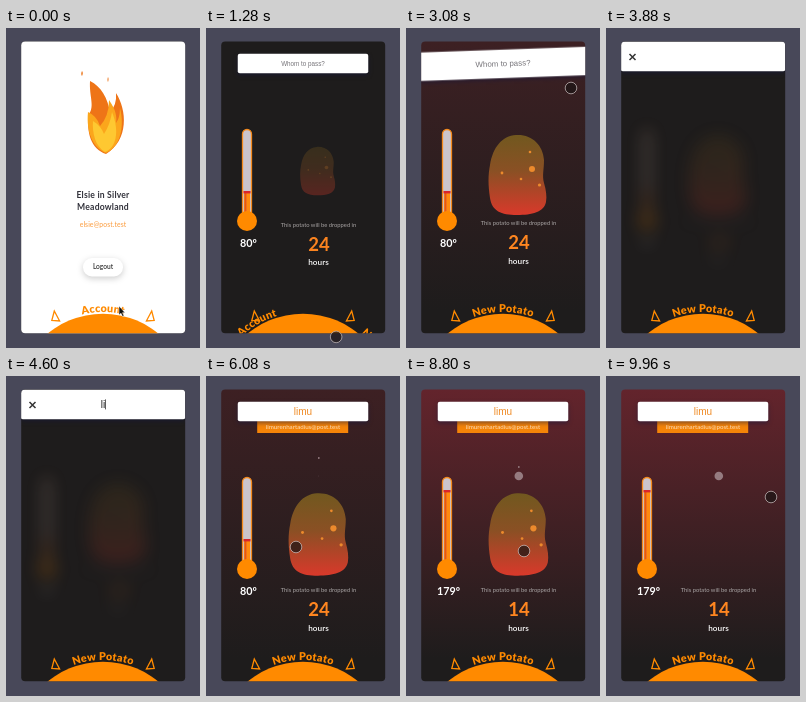
These frames come from a looping animation (194x320 px, 10 s). An HTML page:

```html
<!DOCTYPE html>
<html lang="en">
<head>
<meta charset="utf-8">
<style>
  html, body { margin: 0; width: 100%; height: 100%; overflow: hidden; background: #484859; }
  svg { display: block; width: 100vw; height: 100vh; }
  text { font-family: Lato, sans-serif; text-anchor: middle; }
  .bold { font-weight: 700; }
  .medium { font-weight: 600; }
  .label { font: 900 10.8px Lato, sans-serif; letter-spacing: .25px; fill: #ff8a00; }
  #name, #hint { font-family: "Liberation Sans", Arial, sans-serif; font-size: 10px; }
  #box { filter: drop-shadow(0 2px 2px rgba(20, 22, 60, .5)); }
</style>
</head>
<body>
<svg viewBox="0 0 194 320">
  <defs>
    <clipPath id="card"><rect x="15.2" y="13.6" width="164" height="291.6" rx="4"/></clipPath>
    <linearGradient id="heat" x2="0" y2="1"><stop id="hot"/><stop offset=".92" stop-color="#1e1c1c"/></linearGradient>
    <linearGradient id="skin" x2="0" y2="1">
      <stop stop-color="#71581f"/><stop offset=".45" stop-color="#8a5024"/><stop offset="1" stop-color="#d9392b"/>
    </linearGradient>
    <path id="arc" d="M-89.5 0A89.5 89.5 0 0 1 89.5 0"/>
  </defs>
  <g clip-path="url(#card)">
    <rect x="15" y="13" width="165" height="293" fill="url(#heat)"/>

    <g id="game">
      <g id="meter">
        <rect x="36.5" y="101.5" width="9" height="92" rx="4.5" fill="#cbc4cb" stroke="#f58a1c" stroke-width="1.3"/>
        <rect id="level" x="38" width="6" fill="#ff8a10"/>
        <rect id="core" x="38.6" width="1.8" fill="#e2541c"/>
        <rect id="cap" x="37.5" width="7" height="2.4" fill="#d8262c"/>
        <circle cx="41" cy="193" r="10" fill="#ff8a00"/>
        <text id="degrees" class="bold" x="42.5" y="219.3" font-size="10.8" fill="#fff"></text>
      </g>
      <g id="potato">
        <path d="M-2-40C14-41 25-30 26-15C26 -5 24 0 26 8C28 15 29 21 28 27C26 37 14 40-1 40C-17 40-26 36-28 23C-30 10-30 0-28-10C-25-28-16-39-2-40Z" fill="url(#skin)"/>
        <g fill="#ec8a2c">
          <circle cx="12" cy="-23" r="1.3"/><circle cx="14" cy="-6" r="3"/><circle cx="-16" cy="-2" r="1.4"/>
          <circle cx="3" cy="4" r="1.3"/><circle cx="21.5" cy="10" r="1.6"/>
        </g>
      </g>
      <g id="timer">
        <text x="112.5" y="197.3" font-size="5.8" fill="#aaa6a6">This potato will be dropped in</text>
        <text id="hours" class="bold" x="113" y="221.3" font-size="18.5" fill="#ff8620"></text>
        <text class="medium" x="112.5" y="235.6" font-size="8.2" fill="#fff">hours</text>
      </g>
      <g fill="#957b80"><circle id="ball" cx="112.8" cy="100"/><circle id="spark" cx="112.8" r=".9"/></g>
    </g>

    <g id="tag">
      <rect x="51.2" y="44" width="91" height="13" fill="#f58408"/>
      <text x="97" y="53.2" font-size="6.2" fill="#ffe3c0">limurenhartadius@post.test</text>
    </g>
    <g id="field">
      <rect id="box" fill="#fff" rx="2"/>
      <text id="hint" fill="#77757a">Whom to pass?</text>
      <text id="name" y="3.4"></text>
      <path id="caret" stroke="#333" stroke-width=".8"/>
    </g>
    <path id="close" d="M23.5 26l6 6m0-6l-6 6" stroke="#333" stroke-width="1.5"/>

    <g id="profile">
      <rect x="15" y="13" width="165" height="293" fill="#fff"/>
      <path id="back" fill="#ee7417"/>
      <path id="middle" fill="#fba61c"/>
      <path id="front" fill="#fec831"/>
      <g id="embers" fill="#f0924a"></g>
      <g class="bold" font-size="8.6" letter-spacing=".2" fill="#33333c">
        <text x="97" y="170">Elsie in Silver</text><text x="97" y="181.5">Meadowland</text>
      </g>
      <text x="97" y="198.7" font-size="6.8" letter-spacing=".1" fill="#fb9a3a">elsie@post.test</text>
      <rect x="77" y="230" width="40" height="18.5" rx="9" fill="#fff" style="filter:drop-shadow(0 2px 3px #0003)"/>
      <text class="medium" x="97" y="241.2" font-size="6.6" fill="#333">Logout</text>
    </g>

    <circle cx="97" cy="373" r="87.3" fill="#ff8a00"/>
    <path d="M48.3 283L45.8 292.5L53.6 293ZM145.7 283L148.2 292.5L140.4 293Z" fill="none" stroke="#ff8a00" stroke-width="1.3"/>
    <g id="wheel">
      <text class="label"><textPath href="#arc" startOffset="50%">Account</textPath></text>
      <text class="label" transform="rotate(90)"><textPath href="#arc" startOffset="50%">New Potato</textPath></text>
    </g>
  </g>
  <g id="pointer">
    <path id="arrow" d="M0-4V5L2 3.2L3.5 6.5L5 5.8L3.5 2.7H6Z" fill="#111" stroke="#fff" stroke-width=".5"/>
    <circle id="touch" r="5.8" fill="#1e1516" fill-opacity=".75" stroke="#c9bfbf" stroke-opacity=".8" stroke-width=".9"/>
  </g>
</svg>
<script>
const LOOP = 10000;
const $ = id => document.getElementById(id);
const set = (id, attrs) => { for (const k in attrs) $(id).setAttribute(k, attrs[k]); };
const clamp = v => Math.max(0, Math.min(1, v));
const mix = (a, b, p) => a + (b - a) * p;
const smooth = p => p * p * (3 - 2 * p);
const ramp = (t, a, b) => smooth(clamp((t - a) / (b - a)));

// Eased interpolation through [time, value] stops.
function track(t, stops) {
  let value = stops[0][1];
  for (let i = 1; i < stops.length; i++) {
    const [a, from] = stops[i - 1], [b, to] = stops[i];
    if (t >= a) value = mix(from, to, ramp(t, a, b));
  }
  return value;
}

const pointerPath = [
  [0, 113, 282], [150, 113, 282], [750, 165, 308], [1000, 165, 308], [1600, 88, 310],
  [1900, 88, 310], [2400, 186, 150], [2800, 152, 40], [2920, 152, 40], [3080, 165, 60],
  [5650, 130, 130], [6080, 90, 171], [6400, 116, 174], [8850, 118, 175],
  [9200, 122, 9], [9550, 179, 70], [9850, 165, 121]
];
const pointerX = pointerPath.map(([t, x]) => [t, x]);
const pointerY = pointerPath.map(([t, , y]) => [t, y]);
const keystrokes = [4250, 4450, 4800, 5050];

function drawFlame(t) {
  const w = Math.sin(t / 95) * 2.5, v = Math.sin(t / 70) * 3;
  set('back', { d: `M100 126C85 121 80 104 83 86C89 78 83 68 ${84 + w} ${53 - v}C95 58 102 71 104 84
    Q${111 - w} 77 ${110 - w} ${65 + v}C121 82 123 112 100 126Z` });
  set('middle', { d: `M100 125C87 120 80 104 ${82 - w / 2} ${84 + v}Q91 88 94 98Q103 88 ${103 + w} ${72 - v}
    C110 82 111 89 110 95Q114 90 ${114 - w} ${80 + v}C119 98 114 120 100 125Z` });
  set('front', { d: `M99 124C90 119 86 106 ${87 - w} ${93 + v}Q95 98 98 106Q104 97 ${106 + w} ${84 - v}
    C114 104 110 120 99 124Z` });
  $('embers').innerHTML = [[76, 43, 0], [102, 49, .45]].map(([x, y, phase]) => {
    const p = (t / 700 + phase) % 1;
    return `<path d="M${x + w / 3} ${y - 8 * (p - phase)}q2 2 0 5q-2-2 0-5" opacity="${1 - p * .7}"/>`;
  }).join('');
}

function drawField(t) {
  const open = ramp(t, 2920, 3130) - ramp(t, 5350, 5750);
  const tilt = -2 * (ramp(t, 2920, 3050) - ramp(t, 3100, 3350));
  const bounce = ramp(t, 2920, 3080) - ramp(t, 3080, 3400);
  const w = mix(130.5, 164.5, open) + 14 * bounce, h = mix(19.6, 29.8, open);
  const y = mix(35.5, 28.4, open) + 6.5 * bounce;
  set('field', { transform: `translate(97 ${y}) rotate(${tilt})` });
  set('box', { x: -w / 2, y: -h / 2, width: w, height: h });
  set('hint', {
    y: 2.4, style: `font-size:${mix(6.3, 8.2, open)}px`,
    opacity: 1 - ramp(t, 3500, 3800)
  });

  const count = keystrokes.filter(k => t >= k).length;
  const caretX = [0, 1.4, 2.5, 6.7, 9.4][count];
  $('name').textContent = 'limu'.slice(0, count);
  set('name', { fill: t < 5450 ? '#222' : '#ef8a24' });
  const editing = t > 3700 && t < 5350;
  set('caret', { d: `M${caretX} -5V5`, opacity: editing && (count || t % 1000 < 500) ? 1 : 0 });
  set('close', { opacity: ramp(t, 3400, 3600) - ramp(t, 5300, 5450) });
  set('tag', { opacity: ramp(t, 5600, 5700), transform: `translate(0 ${-13 * (1 - ramp(t, 5600, 5850))})` });
}

function drawGame(t) {
  const hidden = ramp(t, 3150, 3550) - ramp(t, 5400, 5800);
  const shift = ramp(t, 5400, 5850), warm = clamp((t - 6300) / 2000);
  $('game').style.filter = hidden > .01 ? `blur(${hidden * 8}px)` : 'none';
  set('game', { opacity: 1 - hidden * .83 });

  const glow = track(t, [[1400, 0], [2600, .45], [3100, .45], [3500, 0], [5400, 0], [5900, .45], [6300, .45], [8300, 1]]);
  const rgb = [[30, 99], [28, 36], [28, 44]].map(([a, b]) => Math.round(mix(a, b, glow)));
  set('hot', { 'stop-color': `rgb(${rgb})` });

  const level = mix(164, 115, warm);
  set('level', { y: level, height: 192 - level });
  set('core', { y: level, height: 192 - level });
  set('cap', { y: level - 1 });
  set('meter', { opacity: ramp(t, 1080, 1250) });
  $('degrees').textContent = Math.round(mix(80, 179, warm)) + 'º';
  $('hours').textContent = 24 - Math.floor(warm * 10);

  const tapping = t > 6300 && t < 8300;
  const squash = tapping ? .04 * Math.sin((t - 6300) / 200 * Math.PI) ** 2 : 0;
  const grow = track(t, [[1080, .35], [1550, 1]]) * (1 + .03 * shift);
  const thrown = ramp(t, 8850, 9300);
  set('potato', {
    opacity: track(t, [[1120, 0], [1550, 1]]),
    transform: `translate(${112 + shift} ${mix(147, 158.5, shift) - 5 * (1 - ramp(t, 1100, 1700)) - 230 * thrown}) ` +
      `scale(${grow * (1 + squash)} ${grow * (1 - squash)})`
  });
  set('timer', {
    opacity: ramp(t, 1080, 1300),
    transform: `translate(0 ${19 * shift + 2 * (1 - ramp(t, 1200, 1500))})`
  });

  const rise = (t / 1755 + .436) % 1;
  set('ball', { r: track(t, [[6000, 0], [6500, 4.3]]) });
  set('spark', { cy: 100 - 20 * rise, opacity: t > 5950 ? 1 : 0 });
}

function drawPointer(t) {
  const touching = t > 800;
  const away = ramp(t, 3120, 3300) - ramp(t, 5650, 5800);
  set('pointer', {
    transform: `translate(${track(t, pointerX)} ${track(t, pointerY)})`,
    opacity: 1 - away
  });
  set('arrow', { opacity: touching ? 0 : 1 });
  set('touch', { opacity: touching ? 1 : 0 });
}

function draw(now) {
  const t = now % LOOP;
  drawFlame(t);
  drawField(t);
  drawGame(t);
  set('profile', { opacity: 1 - ramp(t, 1060, 1240) });
  set('wheel', { transform: `translate(97 373.5) rotate(${-90 * ramp(t, 1040, 1660)})` });
  drawPointer(t);
  requestAnimationFrame(draw);
}
draw(0);
</script>
</body>
</html>
```
